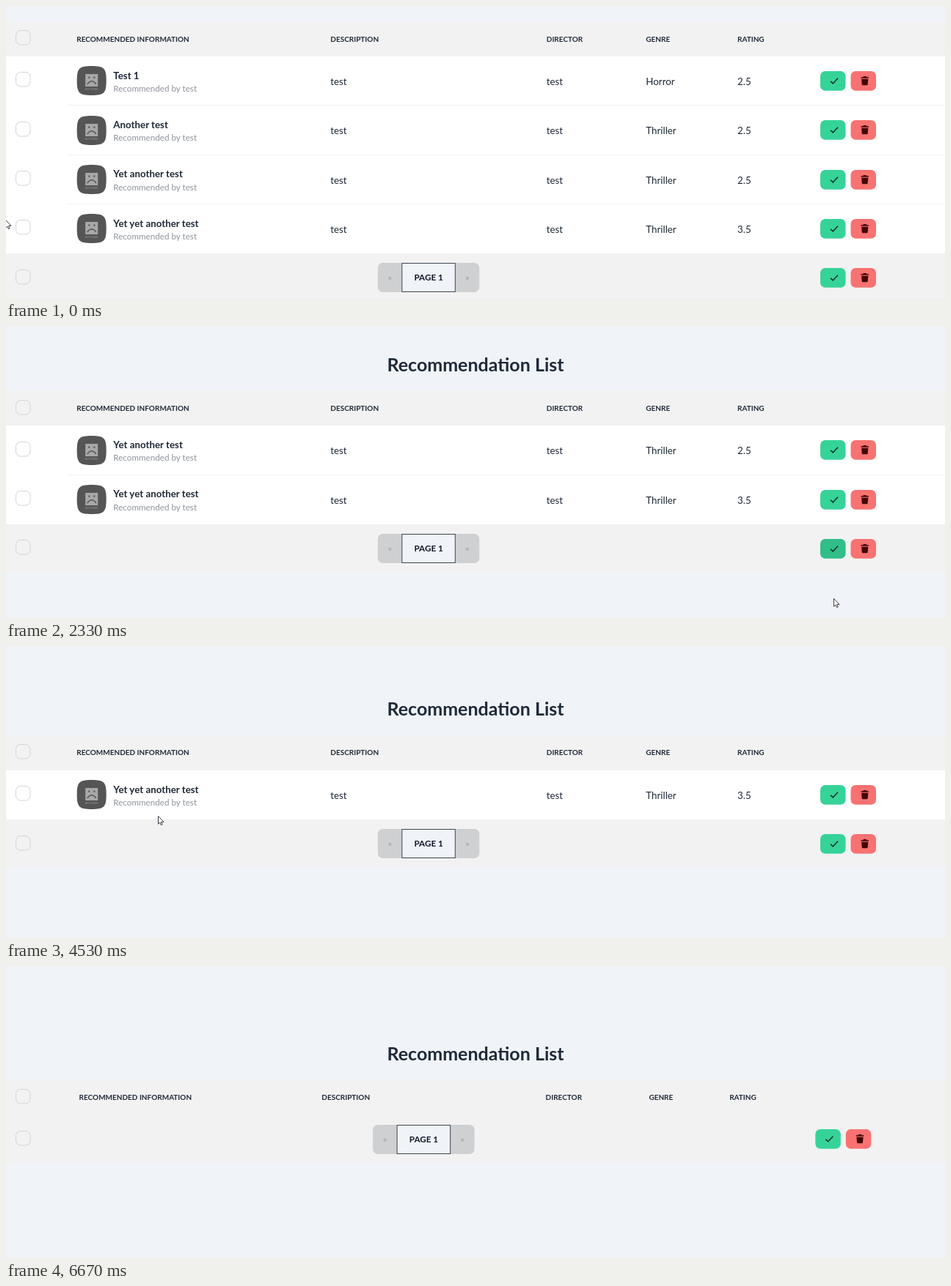
These frames come from a looping animation (1280 px wide and 399 px high, 7340 ms). An HTML page:

```html
<!DOCTYPE html>
<html lang="en">
<head>
<meta charset="utf-8">
<title>Recommendation List</title>
<style>
  html, body { margin: 0; width: 100%; height: 100%; overflow: hidden; background: #f0f4f9; }
  svg { display: block; width: 1280px; height: 399px; font-family: Lato, "Open Sans", sans-serif; fill: #1f2937; }
  .b { font-weight: 700; }
</style>
</head>
<body>
<svg id="stage" viewBox="0 0 1280 399"></svg>
<script>
const LOOP = 7340, STEP = 200 / 3;
const HEAD = 48.2, ROW = 67.25, FOOT = 65.5;
const DARK = '#1f2937', GREEN = '#36d399', RED = '#f87272';
const stage = document.getElementById('stage');

const films = [
  ['Test 1', 'Horror', '2.5'],
  ['Another test', 'Thriller', '2.5'],
  ['Yet another test', 'Thriller', '2.5'],
  ['Yet yet another test', 'Thriller', '3.5'],
];
const heads = ['RECOMMENDED INFORMATION', 'DESCRIPTION', 'DIRECTOR', 'GENRE', 'RATING'];
const cols = [96.3, 442.3, 736.8, 872.3, 997];
const emptyCols = [99.6, 430.3, 735.6, 876.4, 986.2];

// Time from which the list starts at the given film
const removals = [[0, 0], [2270, 2], [3800, 3], [5870, 4]];
// Time at which each film is ticked
const ticks = [730, 1330, Infinity, 4800];

// Pointer path: time, x, y. A key without a place rests at the one before.
const path = [
  [0, -1, 292], [130, 3, 262], [400, 20, 125], [530, 24, 92], [800],
  [1000, 32, 143], [1130, 26, 168], [1330], [1470, 352, 286], [1600, 666, 360], [1730],
  [2000, 1112, 378], [2070, 1128, 372], [2270], [2400, 730, 372], [2530, 262, 335], [2730],
  [2800, 257, 336], [3130, 710, 275], [3530, 1168, 176], [3930],
  [4270, 620, 224], [4530, 83, 234], [4730, 13, 200], [4800],
  [5070, 560, 142], [5330, 1160, 226], [5470, 1203, 244], [5530, 1201, 228],
  [5730, 1174, 212], [5870], [6000, 960, 318], [6130, 714, 343], [6270], [6600, 301, 378],
];
path.forEach((p, i) => { if (p.length === 1) p.push(path[i - 1][1], path[i - 1][2]); });

const text = (x, y, size, str, attrs = '') =>
  `<text x="${x}" y="${y}" font-size="${size}" ${attrs}>${str}</text>`;
const rect = (x, y, w, h, fill, attrs = '') =>
  `<rect x="${x}" y="${y}" width="${w}" height="${h}" fill="${fill}" ${attrs}/>`;
const at = (x, y, body) => `<g transform="translate(${x} ${y})">${body}</g>`;
const line = (d, color, w) => `<path d="${d}" fill="none" stroke="${color}" stroke-width="${w}"/>`;

function checkbox(cy, age = -1) {
  const y = Math.round(cy - 10);
  if (age < 0) return rect(13.5, y + .5, 19.5, 19.5, 'none', 'rx="6.2" stroke="#d2d4d7"');
  const rise = 4 * Math.max(0, 1 - age / 200);
  return rect(13, y, 20.3, 20.3, DARK, 'rx="6.5"') +
    at(13, y + rise, line('M4.8 10.4L8.3 13.8L15.6 6.5', '#fff', 2.5));
}

function buttons(x, cy, hover = 0) {
  const button = (fill, attrs = '') => rect(0, 0, 34.5, 26.7, fill, 'rx="6.7"' + attrs);
  const trash = rect(14, 8.2, 10.4, 1.5, '#450606') + rect(17, 7, 4.4, 2, '#450606', 'rx=".6"') +
    '<path fill="#450606" d="M14.6 10.7H23.8L23.2 18Q23 19.3 21.8 19.3H16.6Q15.3 19.3 15.2 18Z"/>';
  return at(x, Math.round(cy - 13.4),
    button(GREEN) + (hover ? button('#000', ` opacity="${hover}"`) : '') +
    line('M14 13.7L17.2 16.9L24 9.8', '#06301f', 1.5) +
    at(41.5, 0, button(RED) + trash));
}

const avatar = (x, y) => at(x, y,
  '<path fill="#555" d="M0 20C0 3 3 0 20 0S40 3 40 20 37 40 20 40 0 37 0 20Z"/>' +
  rect(11.5, 11, 17, 17, '#a8a8a8') +
  rect(15.6, 14.5, 2, 2.2, '#555') + rect(22.6, 14.5, 2, 2.2, '#555') +
  line('M14 25Q20 16.5 26.2 25', '#555', 1.4) +
  text(20, 33, 3, 'NOT FOUND', 'fill="#999" text-anchor="middle"'));

function pager(x, y) {
  const arrow = (cx, str) => text(cx, 24, 11.67, str, 'class="b" fill="#a5a8ad" text-anchor="middle"');
  return at(x, y,
    rect(0, 0, 138.5, 40, '#cfd0d2', 'rx="6.7"') +
    rect(33, .5, 72.5, 39, '#f0f4f9', 'stroke="#3c4553"') +
    arrow(16.5, '«') + arrow(122, '»') +
    text(69.3, 24.2, 11.67, 'PAGE 1', 'class="b" fill="#111827" text-anchor="middle"'));
}

function filmRow(i, y, age, last) {
  const [name, genre, rating] = films[i];
  const cells = ['test', 'test', genre, rating];
  return rect(0, Math.round(y), 1280, 68, '#fff') +
    (last ? '' : rect(83, Math.round(y + ROW) - 1, 1197, 1, '#f2f2f2')) +
    checkbox(y + 31.4, age) +
    avatar(96.7, Math.round(y + 13.4)) +
    text(146.3, y + 30.8, 13.33, name, 'class="b"') +
    text(146.3, y + 48, 11.67, 'Recommended by test', 'opacity=".5"') +
    cells.map((c, k) => text(cols[k + 1], y + 39, 13.33, c)).join('') +
    buttons(1110, y + 33.6);
}

function layout(t) {
  const first = removals.filter(r => r[0] <= t).pop()[1];
  const count = films.length - first;
  const top = 155.3 - ROW / 2 * count;
  return { first, count, top, foot: top + HEAD + ROW * count };
}

function page(t, { first, count, top, foot }) {
  const xs = count ? cols : emptyCols, shift = count ? 0 : -6.7;
  const hover = t < 2000 || t > 2590 ? 0 : .1 * Math.min(1, (2600 - t) / 270);

  let out = text(640, top - 26.3, 25, 'Recommendation List', 'class="b" text-anchor="middle"');
  out += rect(0, Math.round(top), 1280, HEAD + 1, '#f2f2f2') + checkbox(top + 22.6);
  out += heads.map((h, k) => text(xs[k], top + 27.7, 10, h, 'class="b"')).join('');
  for (let i = first; i < films.length; i++) {
    out += filmRow(i, top + HEAD + ROW * (i - first), t - ticks[i], i === films.length - 1);
  }
  return out + rect(0, Math.round(foot), 1280, FOOT, '#f2f2f2') +
    checkbox(foot + 31.7) +
    pager(506.8 + shift, Math.round(foot + 13.2)) +
    buttons(1110 + shift, foot + 33.3, hover);
}

const arrow = 'M.5 .5V11.3L2.9 9.1L4.4 12.6L6.1 11.9L4.6 8.4H8Z';
const hand = 'M3.4 9V1.6Q3.4 .5 4.4 .5T5.4 1.6V5.4Q6.6 4.7 7.4 5.7Q8.6 5 9.3 6.2Q11.3 5.8 11.3 7.6' +
  'V10.3Q11.3 12 10.2 13.2V14.5H4.6V13.4L.8 9.1Q.2 8 1.3 7.6Q2.2 7.4 3.4 9Z';

// Is the point on a checkbox or a button of any row or the footer?
function clickable(x, y, { top, count, foot }) {
  const box = x >= 13 && x <= 34, button = x >= 1110 && x <= 1186;
  if (box && Math.abs(y - top - 22.6) < 11) return true;
  for (let i = 0; i <= count; i++) {
    const row = foot - ROW * i;
    if (box && Math.abs(y - row - 31.4) < 11) return true;
    if (button && Math.abs(y - row - 33.5) < 13.4) return true;
  }
  return false;
}

function cursor(t, place) {
  const k = path.findIndex(p => p[0] > t);
  if (k < 0) return '';
  const [t0, x0, y0] = path[k - 1], [t1, x1, y1] = path[k];
  const f = (t - t0) / (t1 - t0);
  const x = Math.round(x0 + (x1 - x0) * f), y = Math.round(y0 + (y1 - y0) * f);
  const over = clickable(x, y, place);
  return at(over ? x - 4 : x, y,
    `<path d="${over ? hand : arrow}" fill="#fff" stroke="#2b2b38" stroke-width=".9" stroke-linejoin="round"/>`);
}

let shown = -1;
function tick(now) {
  const step = Math.floor((now % LOOP) / STEP);
  if (step !== shown) {
    shown = step;
    const t = Math.round(step * STEP / 10) * 10, place = layout(t);
    stage.innerHTML = page(t, place) + cursor(t, place);
  }
  requestAnimationFrame(tick);
}
tick(0);
</script>
</body>
</html>
```
